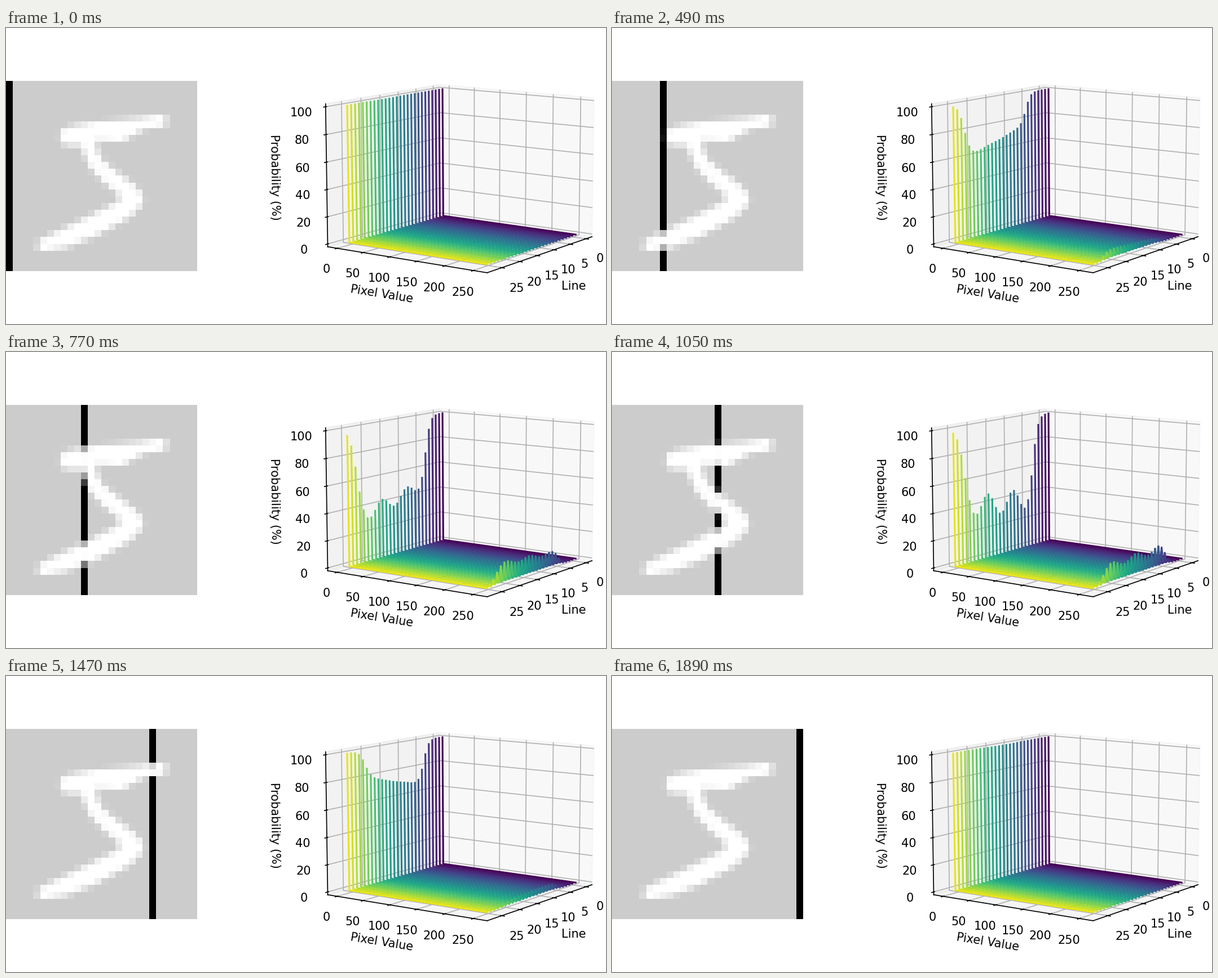
These frames come from a looping animation (1064 px wide and 526 px high, 1.96 s). A matplotlib script:

```python
import matplotlib.pyplot as plt
import numpy as np
from matplotlib.animation import FuncAnimation

WIDTH, HEIGHT, DPI = 1064, 526, 150
SIZE = 28          # cells per side of the digit
ROWS = 27          # curves in the 3D plot
SUB = 10           # samples per cell side for antialiasing

# Pen path of the handwritten digit: x, y and pen radius, in cells.
PEN = np.array([
    (22.6, 5.9, 0.95), (20, 6.3, 0.85), (16.6, 7.4, 1.6), (13, 7.4, 1.35),
    (9.2, 8.2, 1.35), (12, 8.4, 1.1), (12.4, 10.5, 1), (13.3, 12.4, 1.05),
    (15.6, 14.5, 1.15), (18, 16.3, 1.25), (18.5, 17.4, 1.6),
    (17.3, 18.9, 1.4), (12.5, 21.5, 1.5), (8.5, 23.2, 1.3), (5.5, 24.15, 0.9),
])


def draw_digit():
    axis = (np.arange(SIZE * SUB) + 0.5) / SUB
    x, y = np.meshgrid(axis, axis)
    inside = np.zeros(x.shape, bool)
    for (x0, y0, r0), (x1, y1, r1) in zip(PEN[:-1], PEN[1:]):
        dx, dy = x1 - x0, y1 - y0
        t = np.clip(((x - x0) * dx + (y - y0) * dy) / (dx**2 + dy**2), 0, 1)
        distance = np.hypot(x - x0 - t * dx, y - y0 - t * dy)
        inside |= distance < r0 + t * (r1 - r0)
    return 253 * inside.reshape(SIZE, SUB, SIZE, SUB).mean(axis=(1, 3))


def step(distance, softness):
    return 1 / (1 + np.exp(-distance / softness))


def ink_share(row, col):
    """Share of digits with ink at a cell: a soft blob with three strokes."""
    top = 4.3 + 0.035 * (col - 15) ** 2
    bottom = 23.9 - 0.03 * (col - 12) ** 2
    body = 0.62 * np.exp(-np.abs((col - 13.8) / 7.7) ** 3)
    tilt = 1 - 0.0045 * (col - 14) * (row - 13.5)
    depth = 0.14 * np.exp(-((col - 14) / 4) ** 2)
    strokes = 1 + depth * np.cos(2 * np.pi * (row - 6.8) / 6.9)
    edges = step(row - top, 0.7) * step(bottom - row, 0.8)
    return body * tilt * strokes * edges


def probabilities(column):
    """Chance in percent of each pixel value, one row per image line."""
    ink = ink_share(np.arange(ROWS), column)[:, None]
    values = np.arange(256)
    bright = 0.24 * ink ** 1.4 * np.exp(-((values - 253.1) / 1.6) ** 2)
    result = 0.0015 * ink + bright
    result[:, 0] = 1 - ink[:, 0]
    return 100 * result


def padded(low, high, margin):
    """Limits with a data margin and the small offset of the 3D panes."""
    pad = margin * (high - low)
    low, high = low - pad, high + pad
    pad = (high - low) / 48
    return low - pad, high + pad


def pixel_box(left, bottom, width, height):
    return [left / WIDTH, bottom / HEIGHT, width / WIDTH, height / HEIGHT]


digit = draw_digit()

fig = plt.figure(figsize=((WIDTH + 1e-6) / DPI, (HEIGHT + 1e-6) / DPI),
                 dpi=DPI, facecolor="white")

image_ax = fig.add_axes(pixel_box(0, 94, 338.5, 338))
image_ax.axis("off")
image = image_ax.imshow(digit, cmap="gray", vmin=0, vmax=255,
                        interpolation="nearest", aspect="auto")

ax = fig.add_axes(pixel_box(537.6, 0, 526.9, 526.9), projection="3d")
ax.view_init(elev=10, azim=35)
pixel_values = np.arange(256)
curves = [ax.plot(np.full(256, row), pixel_values, np.zeros(256),
                  color=plt.cm.viridis(row / ROWS))[0] for row in range(ROWS)]
ax.set(xlim=padded(0, 27, 0.05), ylim=padded(0, 255, 0.05),
       zlim=padded(0, 100, 0), xticks=range(0, 26, 5),
       yticks=range(0, 251, 50), zticks=range(0, 101, 20),
       xlabel="Line", ylabel="Pixel Value", zlabel="Probability (%)")


def update(column):
    shown = 204 + 0.2 * digit
    shown[:, column] = digit[:, column]
    image.set_data(shown)
    for row, (curve, heights) in enumerate(zip(curves, probabilities(column))):
        curve.set_data_3d(np.full(256, row), pixel_values, heights)
    return [image, *curves]


animation = FuncAnimation(fig, update, frames=SIZE, interval=70,
                          init_func=lambda: update(0), repeat=True)
plt.show()
```
